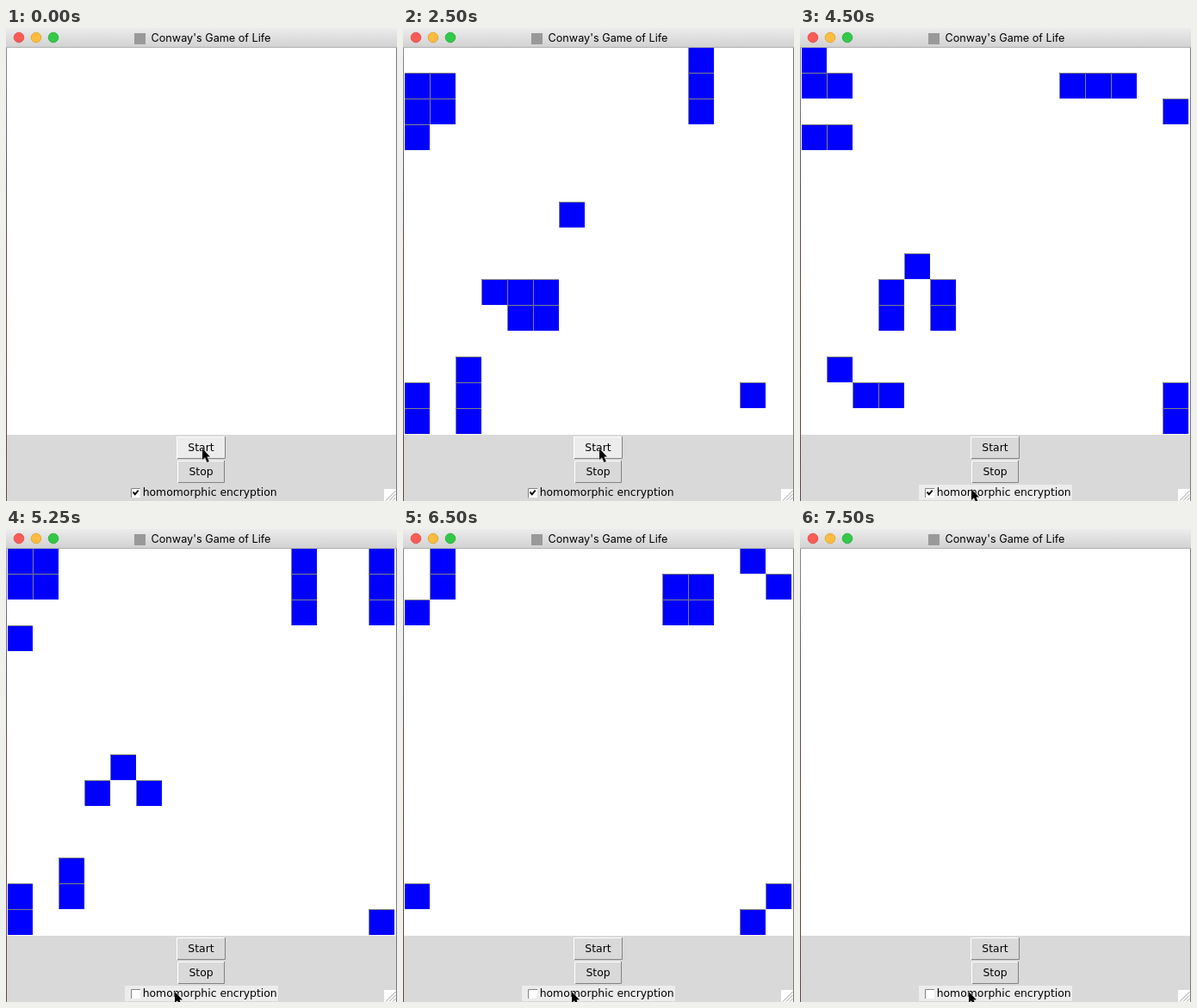
An HTML page that plays this animation: 454x550 px, repeating every 7.75 s.

```html
<!DOCTYPE html>
<html lang="en">
<head>
<meta charset="utf-8">
<title>Conway's Game of Life</title>
<style>
  html, body { margin: 0; width: 454px; height: 550px; overflow: hidden; background: #d9d9d9; }
  svg { display: block; }
  text { text-anchor: middle; font: 12.4px "DejaVu Sans", sans-serif; }
  .title { font: 12.65px Inter, sans-serif; }
  .face { fill: #d9d9d9; }
  .hot .face { fill: #ececec; }
  .light, .dark { fill: none; stroke: #fff; }
  .dark { stroke: #828282; }
</style>
</head>
<body>
<svg width="454" height="550" viewBox="0 0 454 550">
  <defs>
    <linearGradient id="bar" x2="0" y2="1">
      <stop stop-color="#ececec"/><stop offset="1" stop-color="#d2d2d2"/>
    </linearGradient>
    <linearGradient id="edge" x2="0" y2="1">
      <stop stop-color="#8a8a96"/><stop offset=".3" stop-color="#55525c"/>
      <stop offset=".6" stop-color="#6e4638"/><stop offset="1" stop-color="#5a4a46"/>
    </linearGradient>
    <clipPath id="board"><path d="M2 23H452V473H2z"/></clipPath>
  </defs>

  <rect width="454" height="550" fill="#d9d9d9"/>
  <rect y="22" width="454" height="451" fill="#fff"/>
  <rect width="454" height="22" fill="url(#bar)"/>
  <path d="M0 22.5H454" stroke="#b0b0b0"/>
  <rect y="23" width="1" height="527" fill="url(#edge)"/>
  <rect x="453" y="23" width="1" height="527" fill="#77777c"/>
  <g stroke-width=".8">
    <circle cx="15" cy="11" r="5.8" fill="#fc5b57" stroke="#e0443e"/>
    <circle cx="35" cy="11" r="5.8" fill="#fdbc40" stroke="#dfa023"/>
    <circle cx="55" cy="11" r="5.8" fill="#34c84a" stroke="#1dad2b"/>
  </g>
  <rect x="149" y="6" width="13" height="13" fill="#999"/>
  <text class="title" x="238" y="16">Conway's Game of Life</text>

  <g clip-path="url(#board)">
    <path id="cells" fill="#00f"/>
    <path id="lines" fill="none" stroke="#808080"/>
  </g>

  <g id="start">
    <rect class="face" x="198" y="475" width="57" height="26"/>
    <path class="light" d="M198.500 501V475.500H255"/>
    <path class="dark" d="M199 500.500H254.500V475"/>
    <text x="226.500" y="492">Start</text>
  </g>
  <g id="stop">
    <rect class="face" x="199" y="503" width="55" height="26"/>
    <path class="light" d="M199.500 529V503.500H254"/>
    <path class="dark" d="M200 528.500H253.500V503"/>
    <text x="226.500" y="520">Stop</text>
  </g>
  <g id="option">
    <rect class="face" x="138" y="531" width="178" height="18"/>
    <rect x="145" y="535" width="11" height="11" fill="#fff"/>
    <path class="dark" d="M145.500 546V535.500H156"/>
    <path id="tick" d="M147.500 539.500L149.800 542.300L153.700 537.700" fill="none" stroke="#000" stroke-width="2"/>
    <text x="236.700" y="544">homomorphic encryption</text>
  </g>

  <rect x="439" y="536" width="14" height="14" fill="#fff"/>
  <path d="M441 549.500L452.500 538M445 549.500L452.500 542M449 549.500L452.500 546" stroke="#999"/>
  <path id="cursor" d="M0 0V13L3 10.300L5.400 16L7.800 15L5.500 9.500H9z" stroke="#fff" stroke-width=".8" paint-order="stroke"/>
</svg>
<script>
const SIZE = 15, CELL = 30, LOOP = 7750, TICK = 250;
const $ = id => document.getElementById(id);

// Columns of the live cells, row by row
const seed = ['1 7', '2 10 11 12', '0 14', '1 5', '', '5 14', '1 9', '6 7', '2 10',
  '4', '4 5 8 12', '', '1 9 12', '2 3 6 14', '14'].map(row => {
    const live = row.split(' ');
    return Array.from({ length: SIZE }, (_, x) => live.includes(String(x)));
  });

const wrap = n => (n + SIZE) % SIZE;

function evolve(grid) {
  return grid.map((row, y) => row.map((alive, x) => {
    let n = 0;
    for (let dy = -1; dy <= 1; dy++)
      for (let dx = -1; dx <= 1; dx++)
        if (dx || dy) n += grid[wrap(y + dy)][wrap(x + dx)];
    return n === 3 || (alive && n === 2);
  }));
}

const generations = [seed];
while (generations.length < 16) generations.push(evolve(generations.at(-1)));

// Slow steps while encrypted, then a steady fast run
function generationAt(t) {
  if (t >= 6000) return Math.floor(4.5 + (t - 6000) / 142);
  return [1250, 2500, 3750, 4750].filter(s => t >= s).length - 1;
}

const pointer = [[0, 228, 489], [4000, 229, 505], [4250, 199, 530],
  [4500, 199, 536], [4750, 197, 537], [5000, 196, 538]];

function drawBoard(grid) {
  let cells = '', lines = '';
  grid?.forEach((row, r) => row.forEach((alive, c) => {
    if (!alive) return;
    const x = 1 + c * CELL, y = 22 + r * CELL;
    cells += `M${x} ${y}h${CELL}v${CELL}h${-CELL}z`;
    lines += `M${x + .5} ${y + CELL}V${y + .5}h${CELL - .5}`;
  }));
  $('cells').setAttribute('d', cells);
  $('lines').setAttribute('d', lines);
}

let shown = -1;
function frame(now) {
  const t = Math.floor(now % LOOP / TICK) * TICK;
  if (t !== shown) {
    shown = t;
    drawBoard(generations[generationAt(t)]);
    const [, x, y] = pointer.findLast(p => t >= p[0]);
    $('cursor').setAttribute('transform', `translate(${x} ${y})`);
    $('start').classList.toggle('hot', t < 4000);
    $('stop').classList.toggle('hot', t >= 4000 && t < 4500);
    $('option').classList.toggle('hot', t >= 4500);
    $('tick').style.display = t < 5250 ? '' : 'none';
  }
  requestAnimationFrame(frame);
}
const begin = performance.now();
const run = () => frame(performance.now() - begin);
function frameLoop() { run(); }
frame(0);
</script>
</body>
</html>
```
